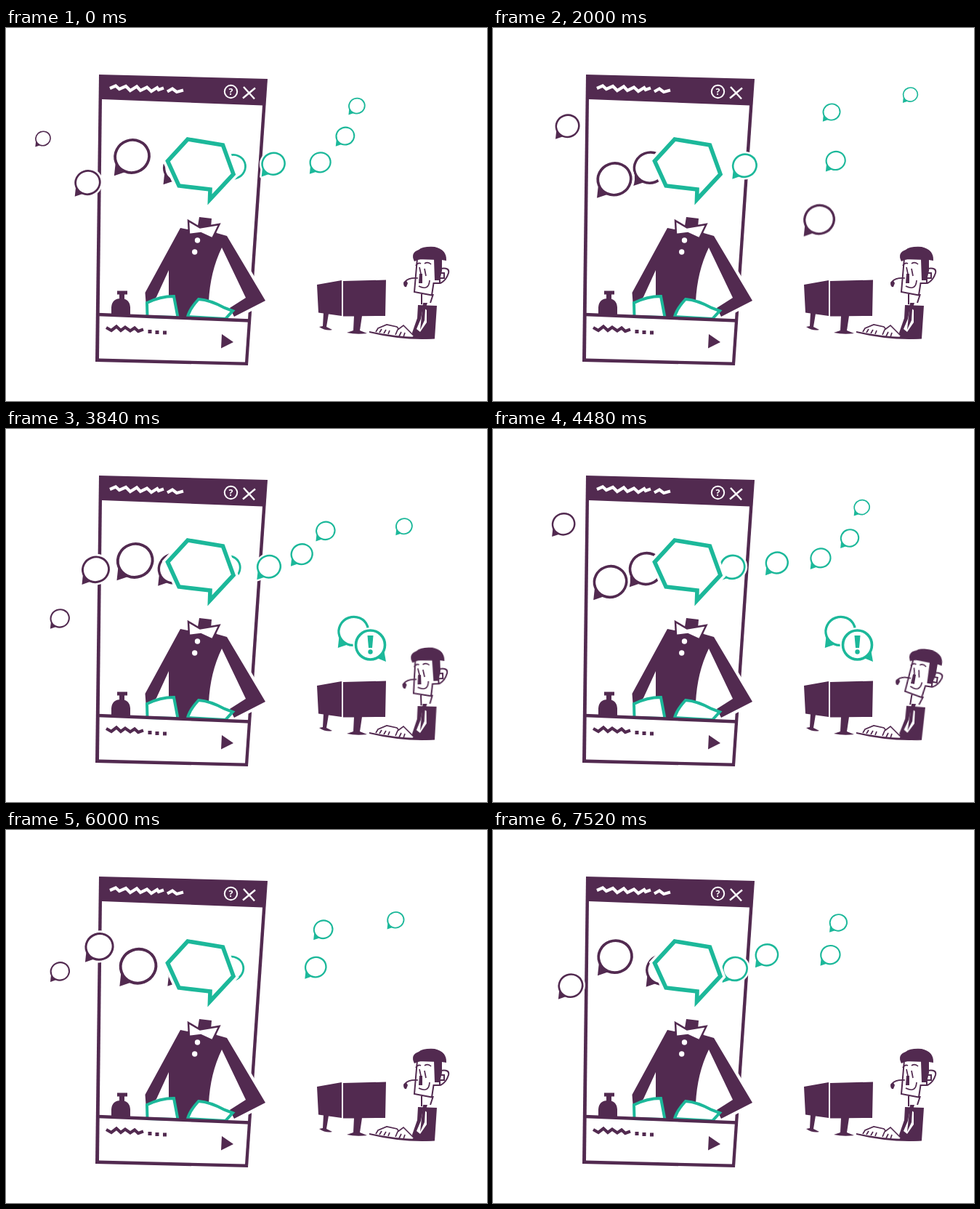
These frames come from a looping animation (662x513 px, 7.56 s). An HTML page:

```html
<!DOCTYPE html>
<html lang="en">
<head>
<meta charset="utf-8">
<title>Chat helper</title>
<style>
  html, body { margin: 0; width: 100%; height: 100%; overflow: hidden; background: #fff; }
  svg { display: block; width: 662px; height: 513px; --ink: #522a50; --mint: #1cb89a; }
  .ink { fill: var(--ink); }
  .white { fill: #fff; }
  .line { fill: none; stroke: var(--ink); }
  .mint { fill: #fff; stroke: var(--mint); }
  .halo { fill: #fff; stroke: #fff; }
  .body, .head, .hand { animation: 7560ms linear infinite; }
  .body { transform-origin: 575px 427px; animation-name: lean; }
  .head { transform-origin: 578px 380px; animation-name: tilt; }
  .hand { animation-name: type; }
  .hand.right { animation-name: type-late; }
  @keyframes lean {
    0%, 49.7%, 75%, 100% { transform: rotate(0deg); }
    50.8% { transform: rotate(-.6deg); }
    54.5%, 71% { transform: rotate(2.5deg); }
  }
  @keyframes tilt {
    0%, 27%, 30%, 49.7%, 75%, 100% { transform: rotate(0deg); }
    28.5%, 50.8% { transform: rotate(-1.4deg); }
    54.5%, 71% { transform: rotate(7deg); }
  }
  @keyframes type {
    0%, 31%, 35%, 39%, 43%, 47%, 100% { transform: none; }
    33%, 37%, 41%, 45% { transform: translateY(-2px); }
  }
  @keyframes type-late {
    0%, 33%, 37%, 41%, 45%, 49%, 100% { transform: none; }
    35%, 39%, 43%, 47% { transform: translateY(-2px); }
  }
</style>
</head>
<body>
<svg viewBox="0 0 662 513">
  <defs>
    <g id="bubble">
      <path class="halo" stroke-width=".3" stroke-linejoin="round" d="M-1 .4L-.4 .95L-1.08 1.15Z"/>
      <ellipse class="white" rx="1.26" ry="1.2" transform="rotate(-20)"/>
      <path fill="currentColor" d="M-.99 .42L-.4 .93L-1.07 1.16Z"/>
      <ellipse fill="#fff" stroke="currentColor" stroke-width=".165" rx="1.02" ry=".97" transform="rotate(-20)"/>
    </g>
  </defs>

  <!-- phone -->
  <path class="ink" d="M128 64L360 70L333 464L123 459Z"/>
  <path class="white" d="M132 98L353 106.5L329 459.5L128 454.5Z"/>
  <path fill="none" stroke="#fff" stroke-width="4.2" d="M143 83L151 79.500L156 84L165 80L171 86L180 80.500L185 86L194 81.500L200 87L208 82L210 85L217 82.500M222 87.500L229 83.500L235 88L244 85.500"/>
  <circle cx="309.500" cy="87.500" r="8.700" fill="none" stroke="#fff" stroke-width="2"/>
  <text x="309.500" y="92" text-anchor="middle" fill="#fff" font-family="'Open Sans', Arial, sans-serif" font-weight="700" font-size="12.500">?</text>
  <path fill="none" stroke="#fff" stroke-width="2.400" d="M327 81L342 97.500M343 82.500L326 96.500"/>
  <path class="line" stroke-width="4.200" d="M138 412L145 416L152 410.500L158 416L164 411.500L171 416.500L177 412.500L182 417L189 414.500"/>
  <path class="ink" d="M195.500 415h5v5h-5zM205.500 416h5v5h-5zM216 416.500h5v5h-5zM297 421L313 432L296 440.500Z"/>

  <!-- bell -->
  <path class="ink" d="M145 395V384Q146 372 158 372T171 384V396ZM156 365h7v8h-7zM153 361.500h14v5h-14z"/>

  <!-- butler -->
  <path class="halo" stroke-width="8" d="M304 286L357 375L314 397L308 385L330 371L297 301Z"/>
  <path class="ink" d="M240 275L250 277L264 272L266 260L283 262L282 274L290 282L304 286L357 375L314 397L308 385L330 371L297 302Q281 335 279 376L272 400H238L224 380L224 333L207 370L193 384L191.500 364Z"/>
  <path class="white" stroke="var(--ink)" stroke-width="2.500" d="M251 265L267 274.500L293.500 270L284 289.500L268 282L252 284Z"/>
  <circle class="white" cx="263.500" cy="292" r="3.700"/>
  <circle class="white" cx="259.700" cy="308" r="3.700"/>
  <path class="mint" stroke-width="4" d="M194.500 397L194 378Q212 369 231 369L236.500 398Z"/>
  <path class="mint" stroke-width="4" d="M250 397Q253 386 265 373Q281 374 301 385L312 389L302 400Z"/>
  <path class="line" stroke-width="4.600" d="M126 394L336 402.500"/>

  <g id="flow"></g>

  <!-- speech head -->
  <path id="speech" class="halo" stroke-width="13" d="M222.500 183L250 153L298.500 161L313 201L280.500 236L281 222L238 217Z"/>
  <path class="mint" stroke-width="5.600" d="M222.500 183L250 153L298.500 161L313 201L280.500 236L281 222L238 217Z"/>

  <!-- desk -->
  <path class="ink" d="M428 353L462 347V396L430 391.500ZM464 348L523 346.500L522 396L464 396.500ZM437 392L444 393L441 411L449 415Q440 417 431 411L436 410ZM479 396H490L487 416L497 420Q482 422 469 419L478 416Z"/>
  <g class="body">
    <path class="ink" d="M567 381L593 382L590 427Q576 429 560 426L559 419L566 399Z"/>
    <path class="white" d="M574 384L579 388L579 405L570 418L565 414L571 400Z"/>
    <path class="ink" d="M574 378L580 378L577 387L576 402L570 415L573 387Z"/>
    <g class="head">
      <path class="white" stroke="var(--ink)" stroke-width="2" d="M572 366V380M588 366L584 378M566 317L562 363L586 367.500L588.500 351L597 351V318Z"/>
      <path class="ink" d="M562 321Q556 309 568 305Q574 300 590 301Q607 305 606 320L600 319V334L597 347L590 347L589 318Q574 315 562 321Z"/>
      <path class="line" stroke-width="2" d="M598 331Q611 329 609 337Q606 347 598 351M597 337H603V344H597"/>
      <path class="line" stroke-width="1.700" d="M564 327Q567 322 571 324M576 324Q581 321 585 325M576 331L578 341M569 329L571 338M568 355Q582 362 583 347M549 349Q554 343 567 344"/>
      <path class="ink" d="M569 338H573V351H568ZM547 350Q551 345 553 351L551 356Q547 357 547 350Z"/>
    </g>
  </g>
  <path class="ink" d="M500 417Q532 424 566 425L590 426V427.500Q545 430 500 419Z"/>
  <path class="hand white" stroke="var(--ink)" stroke-width="1.700" d="M509 418L512 413L524 408L538 411L543 417M514 419L517 414M520 420L523 415M526 421L528 416"/>
  <path class="hand right white" stroke="var(--ink)" stroke-width="1.700" d="M536 422L539 415L547 409L562 424M541 424L544 418M547 425L549 419"/>

  <g id="help"></g>
  <g id="alert">
    <path class="halo" stroke-width="5" d="M11 17L19 10L21.500 23Z"/>
    <circle class="white" r="24"/>
    <path fill="var(--mint)" d="M9 18L19 9L21.500 23Z"/>
    <circle class="mint" r="20" stroke-width="3.600"/>
    <path fill="var(--mint)" d="M-4 -13H4L2.500 4H-2.500Z"/>
    <circle fill="var(--mint)" cy="9.500" r="3.200"/>
  </g>
</svg>
<script>
const LOOP = 7560, CYCLE = 2520, LIFE = 2130;
const $ = id => document.getElementById(id);
const clamp = v => Math.min(1, Math.max(0, v));

// incoming: start time in the cycle, starting height offset
const asks = [[0, -40], [392, -80], [789, 3], [1150, 86], [1622, -100], [2070, 41]];

// outgoing: birth, x speed, rise after two seconds, curve power
const replies = [
  [-1788, .0995, 96, 1.2], [-1360, .119, 70, 1.3], [-918, .139, 64, 3],
  [-478, .132, 74, 2], [-57, .131, 94, 2], [390, .1, 98, 1.2],
  [818, .141, 70, 4], [1700, .138, 76, 2], [2080, .138, 74, 2],
  [2568, .106, 88, 1.2], [3060, .131, 64, 1.3], [3430, .139, 56, 2.2],
  [3840, .134, 68, 2], [4299, .136, 90, 1.8], [4746, .105, 95, 1.2],
  [5140, .141, 70, 4], [5957, .109, 92, 1.5], [6365, .138, 58, 2],
  [6940, .124, 90, 1.25], [7325, .144, 70, 4]
];

function makeBubble(color, parent) {
  const use = document.createElementNS("http://www.w3.org/2000/svg", "use");
  use.setAttribute("href", "#bubble");
  use.style.color = `var(--${color})`;
  return parent.appendChild(use);
}

function place(el, visible, x, y, scale) {
  el.style.display = visible ? "" : "none";
  if (visible) el.setAttribute("transform", `translate(${x} ${y}) scale(${scale})`);
}

const askEls = asks.map(() => makeBubble("ink", $("flow")));
const replyEls = replies.map(() => makeBubble("mint", $("flow")));
const helpEl = makeBubble("ink", $("help"));

function drawAsk(el, [start, offset], t) {
  const age = (t - start + CYCLE) % CYCLE;
  const x = 51 + .1365 * age;
  const y = 192 + offset * (1 - clamp((x - 51) / 184)) ** 1.7;
  const r = x < 182 ? 10 + .107 * (x - 51) : 24 - .07 * (x - 182);
  place(el, x < 268, x, y, r);
}

function drawReply(el, [birth, speed, rise, power], t) {
  const age = t - birth, grown = Math.max(0, age);
  const y = 191 - rise * (grown / 2000) ** power;
  place(el, age > -250 && age < LIFE, 305 + speed * age, y, 17 - .0035 * grown);
}

function drawHelp(t) {
  const go = Math.min(t, 2150) - 1260;
  const out = clamp((4700 - t) / 160);
  const r = 17 + 3 * clamp(go / 740);
  helpEl.style.color = t < 3400 ? "var(--ink)" : "var(--mint)";
  place(helpEl, t > 1080 && out > 0, 305 + .1946 * go, 192 + .0965 * go, r * out);
  const pop = clamp((t - 3400) / 160) * out;
  place($("alert"), pop > 0, 501.5, 297, pop);
}

function frame(now) {
  const t = now % LOOP;
  askEls.forEach((el, i) => drawAsk(el, asks[i], t % CYCLE));
  replyEls.forEach((el, i) => drawReply(el, replies[i], t));
  drawHelp(t);
}

let origin;
function tick(now) {
  origin ??= now;
  frame(now - origin);
  requestAnimationFrame(tick);
}
frame(0);
requestAnimationFrame(tick);
</script>
</body>
</html>
```
